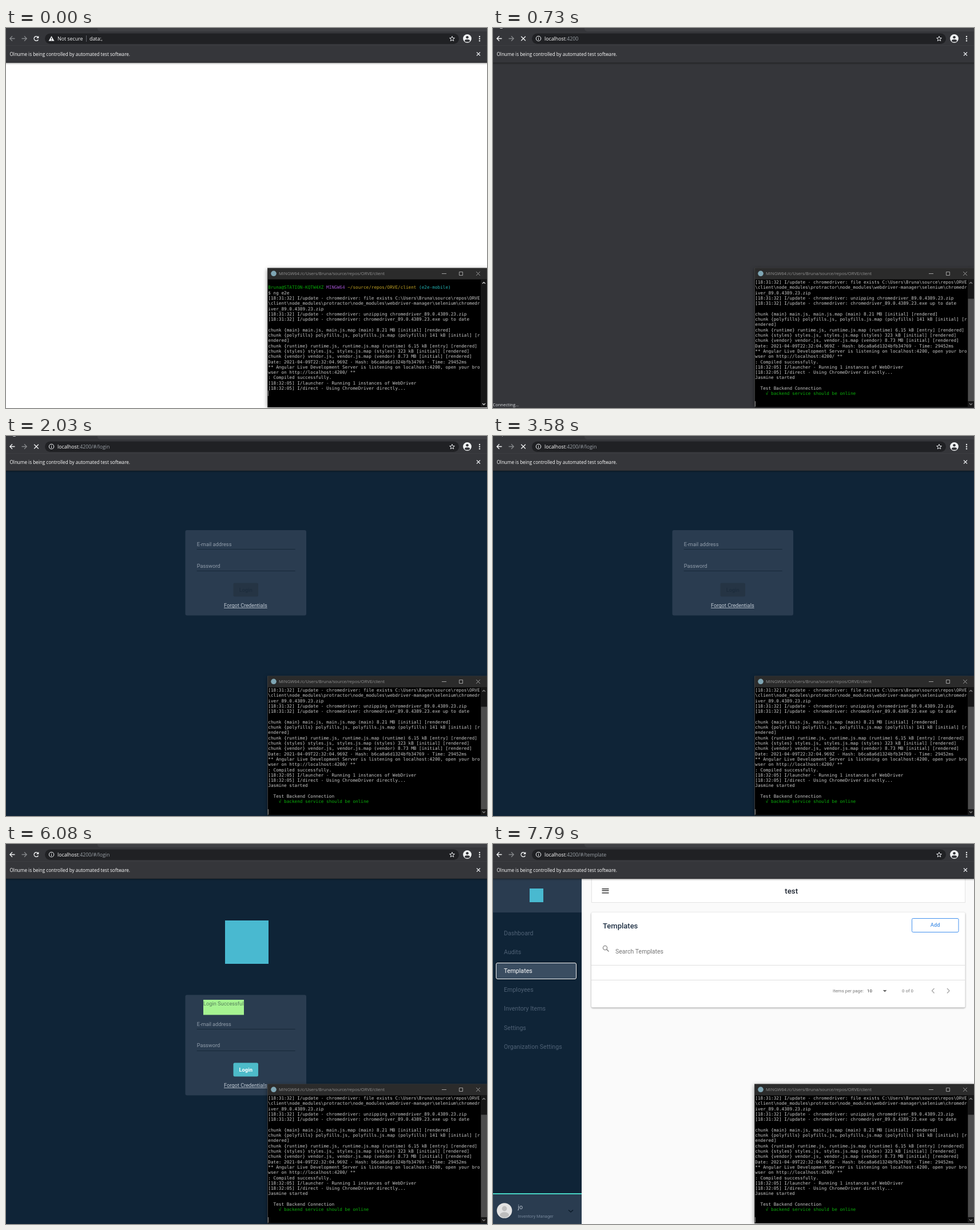
Recreate the animation shown at these times as an HTML page with a canvas. Size 841 px wide and 666 px high, loop 8000 ms.

```html
<!DOCTYPE html>
<html lang="en">
<head>
<meta charset="utf-8">
<title>End-to-end test run</title>
<style>
html, body { margin: 0; width: 100%; height: 100%; overflow: hidden; background: #fff; }
canvas { display: block; }
</style>
</head>
<body>
<canvas id="stage" width="841" height="666"></canvas>
<script>
const c = document.getElementById('stage').getContext('2d');
const UI = '"Open Sans", "Noto Sans", sans-serif';
const APP = 'Roboto, sans-serif';
const MONO = '"DejaVu Sans Mono", monospace';
const NAVY = '#0f2437', SLATE = '#2a3c50', BAR = '#35363a', TEAL = '#49b9d0';
const LOOP = 8000;

const log = String.raw`

$ ng e2e
[18:31:32] I/update - chromedriver: file exists C:\Users\Bruna\source\repos\ORVE
\client\node_modules\protractor\node_modules\webdriver-manager\selenium\chromedr
iver_89.0.4389.23.zip
[18:31:32] I/update - chromedriver: unzipping chromedriver_89.0.4389.23.zip
[18:31:32] I/update - chromedriver: chromedriver_89.0.4389.23.exe up to date

chunk {main} main.js, main.js.map (main) 8.21 MB [initial] [rendered]
chunk {polyfills} polyfills.js, polyfills.js.map (polyfills) 141 kB [initial] [r
endered]
chunk {runtime} runtime.js, runtime.js.map (runtime) 6.15 kB [entry] [rendered]
chunk {styles} styles.js, styles.js.map (styles) 323 kB [initial] [rendered]
chunk {vendor} vendor.js, vendor.js.map (vendor) 8.73 MB [initial] [rendered]
Date: 2021-04-09T22:32:04.969Z - Hash: b6ca8a6d1324bfb34769 - Time: 29452ms
** Angular Live Development Server is listening on localhost:4200, open your bro
wser on http://localhost:4200/ **
: Compiled successfully.
[18:32:05] I/launcher - Running 1 instances of WebDriver
[18:32:05] I/direct - Using ChromeDriver directly...
Jasmine started

  Test Backend Connection
    √ backend service should be online`.split('\n');

const clamp = v => Math.max(0, Math.min(1, v));
const ease = v => 1 - (1 - clamp(v)) ** 3;

function rect(x, y, w, h, fill) {
  c.fillStyle = fill;
  c.fillRect(x, y, w, h);
}
function round(x, y, w, h, r, fill, stroke) {
  c.beginPath();
  c.roundRect(x, y, w, h, r);
  if (fill) { c.fillStyle = fill; c.fill(); }
  if (stroke) { c.strokeStyle = stroke; c.lineWidth = 1; c.stroke(); }
}
function disc(x, y, r, fill) {
  c.beginPath();
  c.arc(x, y, r, 0, 7);
  c.fillStyle = fill;
  c.fill();
}
function ring(x, y, r, color, from = 0, to = 7, w = 1.1) {
  c.beginPath();
  c.arc(x, y, r, from, to);
  c.strokeStyle = color;
  c.lineWidth = w;
  c.stroke();
}
// Each path is a flat list of x, y pairs
function shape(color, w, ...paths) {
  c.beginPath();
  for (const p of paths)
    for (let i = 0; i < p.length; i += 2) c[i ? 'lineTo' : 'moveTo'](p[i], p[i + 1]);
  if (w) {
    c.strokeStyle = color; c.lineWidth = w; c.stroke();
  } else {
    c.fillStyle = color; c.fill();
  }
}
function cross(x, y, r, color, w = 1.2) {
  shape(color, w, [x - r, y - r, x + r, y + r], [x + r, y - r, x - r, y + r]);
}
// Text centred vertically on y, on a whole-pixel baseline; returns its width
function text(s, x, y, size, color, font = APP, weight = 400, align = 'left') {
  c.font = `${weight} ${size}px ${font}`;
  c.fillStyle = color;
  c.textAlign = align;
  c.fillText(s, x, Math.round(y + size * 0.36));
  return c.measureText(s).width;
}
function shadowed(blur, color, draw) {
  c.save();
  c.shadowBlur = blur;
  c.shadowColor = color;
  c.shadowOffsetY = 1;
  draw();
  c.restore();
}

function arrow(x, dir, color) {
  const y = 18.5;
  shape(color, 1.3, [x - 4.5 * dir, y, x + 4 * dir, y],
    [x, y - 4.2, x + 4.2 * dir, y, x, y + 4.2]);
}

function browser(t) {
  rect(0, 0, 841, 60, BAR);
  round(160, -8, 700, 14, 5, '#3f4044');
  rect(0, 30, 841, 1, '#3c3d41');
  rect(0, 60, 841, 1, '#2c2d30');
  for (let i = 0; i < 3; i++) rect(0, 61 + i, 841, 1, `rgba(0,0,0,${0.26 - i * 0.09})`);

  const started = t >= 260, loading = started && t < 4490;
  arrow(11, -1, started ? '#f1f3f4' : '#85878a');
  arrow(32, 1, '#85878a');
  if (loading) cross(53, 18.5, 3.8, '#f1f3f4', 1.3);
  else {
    ring(53, 18.5, 3.9, '#f1f3f4', 0.5, 5.5, 1.4);
    shape('#f1f3f4', 0, [57.3, 13.8, 57.3, 18, 53, 18]);
  }

  round(68, 9.5, 724, 18.5, 9.25, '#202124');
  if (started) {
    ring(79.5, 18.5, 4.2, '#e8eaed');
    rect(79, 18, 1, 3, '#e8eaed');
    rect(79, 16, 1, 1, '#e8eaed');
    const path = t < 1500 ? '' : t < 7300 ? '/#/login' : t < 7660 ? '/#/dashboard' : '/#/template';
    const w = text('localhost', 90, 18.5, 8.8, '#fff', UI);
    text(':4200' + path, 90 + w, 18.5, 8.8, '#9aa0a6', UI);
  } else {
    shape('#f1f3f4', 0, [79.5, 14, 84.5, 22.8, 74.5, 22.8]);
    rect(79, 17, 1, 3, '#202124');
    rect(79, 21, 1, 1, '#202124');
    text('Not secure', 90, 18.5, 8.8, '#f1f3f4', UI);
    rect(140, 13, 1, 11, '#5f6368');
    text('data:,', 146, 18.5, 8.8, '#fff', UI);
  }

  const star = [];
  for (let i = 0; i <= 10; i++) {
    const a = i * Math.PI / 5 - Math.PI / 2, r = i % 2 ? 2 : 4.6;
    star.push(780 + r * Math.cos(a), 19 + r * Math.sin(a));
  }
  shape('#e8eaed', 1, star);
  disc(806.5, 18.5, 7.4, '#f1f3f4');
  disc(806.5, 16.2, 2.3, BAR);
  c.beginPath();
  c.ellipse(806.5, 22.2, 4.5, 2.3, 0, 0, 7);
  c.fillStyle = BAR;
  c.fill();
  for (const y of [15, 18.7, 22.4]) disc(828, y, 1.2, '#f1f3f4');

  text('Olnume is being controlled by automated test software.', 6.5, 45.8, 8.13, '#fff', UI);
  cross(826, 45.5, 3, '#e8eaed');

  // Lower edge of the tab's loading spinner
  const spins = [[680, 1500], [2030, 2080], [2330, 3040], [3550, 4250]];
  if (spins.some(([a, b]) => t >= a && t < b)) {
    const a = t / 160 % 6.283;
    c.save();
    c.beginPath();
    c.rect(12, 0, 5, 1);
    c.clip();
    ring(14.5, -4, 4.6, '#c8cacd', a, a + 4, 1.2);
    c.restore();
  }
}

function status() {
  round(-4, 653.5, 281, 16, 3, BAR);
  text('Connecting...', -0.5, 660, 7.5, '#dcdee1', UI);
}

function field(label, x, y, value, lift) {
  text(label, x, y - 13 * lift, 9.25 - 2.35 * lift, '#919dab');
  if (value) text(value, x, y, 9.25, '#dde2e8');
  rect(x, Math.round(y + 8.2), 172, 1, '#172838');
}

function login(t) {
  rect(0, 61, 841, 605, NAVY);
  const ready = t >= 4490, done = t >= 5820;
  if (ready) rect(383, 134, 76, 76, TEAL);
  const top = ready ? 264.5 : 165, y = top + (done ? 26.5 : 0);
  round(313.5, top, 211.5, done ? 176 : 149.5, 3, SLATE);
  if (done) {
    rect(345, 273, 71, 26.5, '#a6f391');
    text('Login Successful', 345, 279.2, 9.25, '#55805c');
  }

  const back = 1 - ease((t - 5820) / 400);
  const lift = start => done ? back : ease((t - start) / 120);
  const typed = (s, start) => done ? '' : s.slice(0, Math.max(0, Math.floor((t - start) / 8)));
  field('E-mail address', 333.7, y + 25.1, typed('jo@web.test', 4730), lift(4730));
  field('Password', 333.7, y + 62.3, '', lift(4840));
  typed('********', 4840).split('').forEach((_, i) => disc(335.3 + i * 3.15, y + 62, 1.2, '#dde2e8'));

  const on = clamp((t - 4890) / 170);
  const mix = (a, b) => Math.round(a + (b - a) * on);
  round(397.5, y + 92.6, 43.5, 24, 2.5, `rgb(${mix(37, 77)},${mix(52, 187)},${mix(68, 201)})`);
  text('Login', 419.2, y + 104.3, 9.3, on ? '#fff' : '#1c2c3c', APP, on ? 700 : 500, 'center');
  const w = text('Forgot Credentials', 381, y + 131.8, 9.25, '#c3ccd6');
  rect(381, Math.round(y + 136), w, 1, '#a5b0bc');
}

function dashboard(t) {
  const open = t >= 7660;
  rect(155, 61, 686, 605, '#fafafa');
  rect(0, 61, 155, 605, NAVY);
  rect(0, 61, 155, 59, SLATE);
  rect(64, 78, 24, 24, TEAL);

  ['Dashboard', 'Audits', 'Templates', 'Employees', 'Inventory Items', 'Settings',
    'Organization Settings'].forEach((name, i) => {
    const y = 156 + i * 33.15, active = open && i === 2;
    if (active) {
      round(4.5, 207.5, 142, 30, 3, '#101820');
      round(5.5, 208.5, 140, 28, 2.5, '#3a4d61', '#f4f6f8');
    }
    text(name, 19, y, 10.65, active ? '#fff' : '#4f6175');
  });

  rect(0, 612, 155, 54, SLATE);
  rect(0, 612, 155, 2, '#48d4c4');
  disc(20, 642.5, 13.3, '#e2e2e2');
  disc(20, 639, 4.4, '#bdbdbd');
  c.beginPath();
  c.ellipse(20, 650, 8, 4.7, 0, 0, 7);
  c.fill();
  text('jo', 43.5, 636, 10.6, '#b9c3ce');
  text('Inventory Manager', 43.5, 652, 7.5, '#75869a');
  shape('#0d1b29', 1.4, [132, 641.5, 136, 645, 140, 641.5]);

  rect(172, 61, 654, 42, '#e4e4e4');
  rect(173, 61, 652, 41, '#fff');
  for (const y of [78, 81, 85]) rect(190.5, y, 12, 1.4, '#222');
  text('test', 521.7, 82, 13.2, '#1d2430', APP, 500, 'center');
  if (!open) return;

  shadowed(3, 'rgba(0,0,0,.4)', () => round(172, 120, 653.5, 166.5, 2.5, '#fff'));
  text('Templates', 192, 143.3, 13, '#1f3044', APP, 500);
  round(732.5, 130.5, 81.5, 24, 2, '#fff', '#4290ee');
  text('Add', 773.2, 142, 9.3, '#4c94e8', APP, 500, 'center');
  ring(196, 182, 3.6, '#8a8a8a', 0, 7, 1.3);
  shape('#8a8a8a', 1.5, [198.6, 184.6, 202.5, 188.5]);
  text('Search Templates', 214, 188, 10.5, '#757575');
  rect(172, 212, 653.5, 1, '#e0e0e0');
  rect(172, 238, 653.5, 1, '#e0e0e0');
  text('Items per page:', 594, 257.3, 7.85, '#777');
  text('10', 654, 257.3, 7.9, '#333');
  shape('#666', 0, [681.7, 256, 688.5, 256, 685.1, 259.5]);
  text('0 of 0', 715, 257.3, 7.9, '#777');
  shape('#aaa', 1.4, [771.5, 253, 767.5, 257.2, 771.5, 261.4], [794, 253, 798, 257.2, 794, 261.4]);
}

function terminal(t) {
  shadowed(7, 'rgba(0,0,0,.45)', () => rect(457, 420.5, 384, 244.5, '#3e3e3e'));
  rect(458, 421, 383, 19.5, '#2b2b2b');
  rect(458, 440.5, 383, 224, '#000');
  disc(468, 430.3, 4.8, '#7fa6b4');
  text('MINGW64:/c/Users/Bruna/source/repos/ORVE/client', 477, 430.5, 7.6, '#929292', UI);
  rect(762, 430, 8, 1, '#a0a0a0');
  round(792.5, 427.5, 6, 6, 0, null, '#a0a0a0');
  cross(825.5, 430.5, 3.3, '#a0a0a0', 1);

  const skip = t < 280 ? 0 : 3;
  const count = t < 280 ? 21 : t < 320 ? 22 : log.length;
  const rowY = i => 445.4 + (i - skip) * 9.29;
  for (let i = skip; i < count; i++)
    text(log[i], 458.3, rowY(i), 7.7, log[i].includes('√') ? '#0bb00b' : '#cacaca', MONO);
  if (!skip) {
    let x = 458.3;
    for (const [s, color] of [['Bruna@STATION-KQTW4XZ ', '#08ad08'], ['MINGW64 ', '#a353cf'],
      ['~/source/repos/ORVE/client ', '#c2a324'], ['(e2e-mobile)', '#22b3b3']])
      x += text(s, x, rowY(1), 7.7, color, MONO);
  }
  rect(458, rowY(count < 24 ? count : 26) - 5, 1, 9.5, '#8c8c8c');

  rect(830, 440.5, 11, 224, '#171717');
  if (skip) rect(830.5, 474.5, 10.5, 179.5, '#4d4d4d');
  const tip = skip ? '#8a8a8a' : '#e0e0e0';
  shape(tip, 1.2, [833, 448, 835.5, 445.5, 838, 448], [833, 658, 835.5, 660.5, 838, 658]);
}

function draw(now) {
  const t = now % LOOP;
  const blank = t >= 680 && t < 850;
  rect(0, 0, 841, 666, blank ? BAR : '#fff');
  if (t >= 7530) dashboard(t);
  else if (t >= 1780) login(t);
  browser(t);
  if (blank || t >= 7330 && t < 7660) status();
  terminal(t);
}

const begin = performance.now();
function tick() {
  draw(performance.now() - begin);
  requestAnimationFrame(tick);
}
tick();
</script>
</body>
</html>
```
